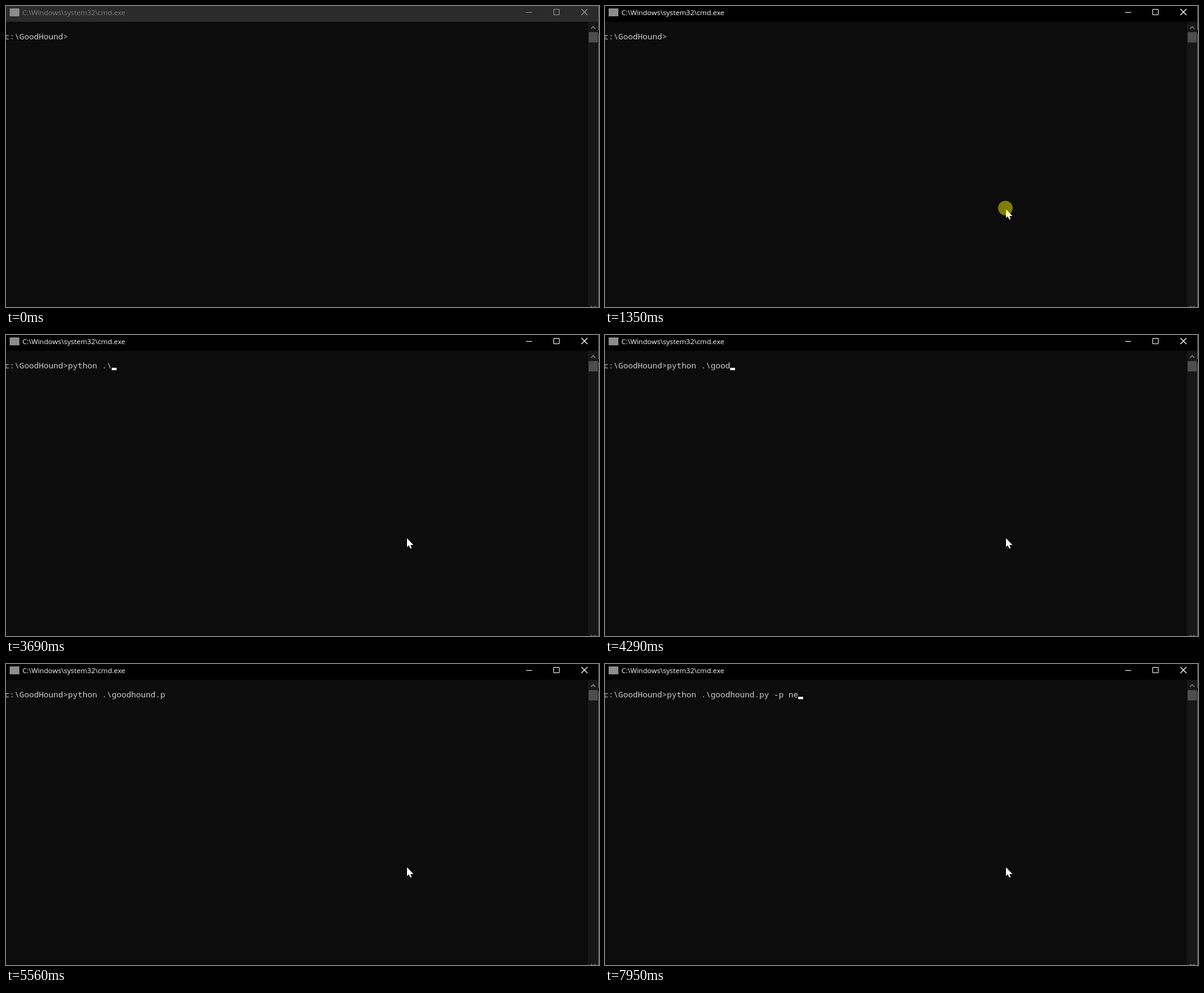
Animation of 976 by 496 pixels, one loop 8 s. Source, as an HTML page:

```html
<!DOCTYPE html>
<html lang="en">
<head>
<meta charset="utf-8">
<title>Console typing</title>
<style>
  html, body { margin: 0; width: 100%; height: 100%; overflow: hidden; background: #0c0c0c; }
  svg { display: block; width: 976px; height: 496px; }
  .title { font: 11.62px "Open Sans", "Noto Sans", sans-serif; }
  .console { font: 13.333px "Noto Sans Mono", "DejaVu Sans Mono", monospace; white-space: pre; fill: #ccc; }
</style>
</head>
<body>
<svg viewBox="0 0 976 496">
  <rect width="976" height="496" fill="#0c0c0c"/>
  <rect id="bar" width="976" height="26"/>
  <rect x="6" y="4" width="16" height="13" fill="#8c8c8c"/>
  <text id="title" class="title" x="27" y="15">C:\Windows\system32\cmd.exe</text>
  <g id="buttons" fill="none">
    <path d="M856 10.5h10M901.5 5.5h9v9h-9z"/>
    <path d="M947 5l10 10M957 5l-10 10" stroke-width="1.3"/>
  </g>

  <rect x="958" y="26" width="17" height="470" fill="#171717"/>
  <rect x="959" y="43" width="15" height="17" fill="#4d4d4d"/>
  <path d="M963 37.5l3.5-3.5 3.5 3.5M963 494.5l3.5 3.5 3.5-3.5" fill="none" stroke="#868686" stroke-width="1.5"/>
  <path d="M975.5 0v40M975.5 45v451" stroke="#6b6b6b"/>

  <text id="line" class="console" x="-2" y="55"></text>
  <rect id="caret" y="54" width="8" height="4" fill="#f2f2f2"/>

  <path id="pointer" d="M0 0v14.5l3-3 2.2 5h2.6l-2.2-5.5h5z" fill="#fff"/>
  <circle id="click" cx="659" cy="333" r="12" fill="#ff0" fill-opacity=".47"/>
</svg>
<script>
const LOOP = 8000, CELL = 8, FOCUS = 1350;
const PROMPT = "c:\\GoodHound>";
const COMMAND = "python .\\goodhound.py -p ne";

// Each key press shows the caret; a later blink may hide or restore it.
const keyTimes = [
  2210, 2340, 2410, 2540, 2610, 2740, 2940,
  3620, 3690, 4020, 4150, 4220, 4290,
  4560, 4690, 4760, 4890, 5020,
  5160, 5360, 5690, 6100, 6830, 7230, 7490, 7690, 7950
];
const blinkOff = [3490, 3950, 4490, 5020, 5560, 6100, 7160];
const blinkOn = [1880, 6630];

const el = id => document.getElementById(id);
const [bar, title, buttons, line, caret, pointer, click] =
  ["bar", "title", "buttons", "line", "caret", "pointer", "click"].map(el);
const show = (node, on) => node.setAttribute("visibility", on ? "visible" : "hidden");
const latest = (times, t) => Math.max(-1, ...times.filter(x => x <= t));

function draw(t) {
  const active = t >= FOCUS;
  bar.setAttribute("fill", active ? "#000" : "#2b2b2b");
  title.setAttribute("fill", active ? "#fff" : "#808080");
  buttons.setAttribute("stroke", active ? "#fff" : "#999");

  const typed = keyTimes.filter(x => x <= t).length;
  line.textContent = PROMPT + COMMAND.slice(0, typed);
  caret.setAttribute("x", -2 + CELL * (PROMPT.length + typed));
  const lit = Math.max(latest(keyTimes, t), latest(blinkOn, t));
  show(caret, lit > latest(blinkOff, t));

  const [x, y] = t < 1080 ? [855, 420] : [660, 335];
  pointer.setAttribute("transform", `translate(${x} ${y})`);
  show(pointer, t >= 1010);
  show(click, active && t < 1550);
}

const start = performance.now();
function tick() {
  draw((performance.now() - start) % LOOP);
  requestAnimationFrame(tick);
}
draw(0);
requestAnimationFrame(tick);
</script>
</body>
</html>
```
